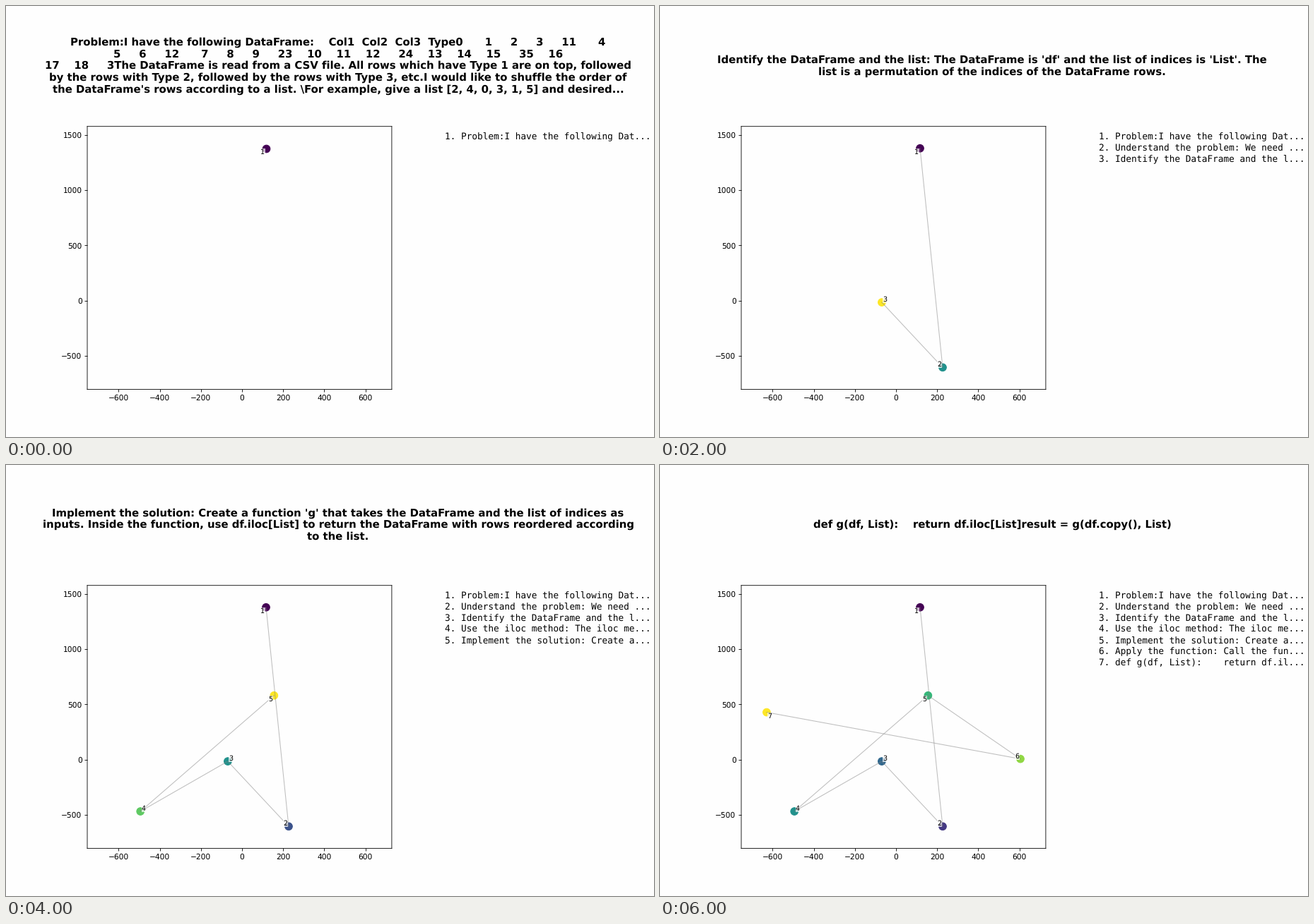
Recreate the animation shown at these times as a matplotlib script. Size 917 by 611 pixels, loop 7 s.

```python
import matplotlib.pyplot as plt
from matplotlib.animation import FuncAnimation

W, H, DPI = 917, 611, 76.4
PAPER = "#fefefe"

plt.rcParams["text.hinting"] = "none"

# Title lines of every step
STEPS = [
    ["Problem:I have the following DataFrame:    Col1  Col2  Col3  Type0"
     "      1     2     3     11      4",
     "5     6     12      7     8     9     23    10    11    12     24"
     "    13    14    15     35    16",
     "17    18     3The DataFrame is read from a CSV file. "
     "All rows which have Type 1 are on top, followed",
     "by the rows with Type 2, followed by the rows with Type 3, etc."
     "I would like to shuffle the order of",
     "the DataFrame's rows according to a list. \\For example, "
     "give a list [2, 4, 0, 3, 1, 5] and desired..."],
    ["Understand the problem: We need to shuffle the rows of the DataFrame "
     "according to a given list of",
     "indices. The list specifies the new order of the rows."],
    ["Identify the DataFrame and the list: The DataFrame is 'df' and the list "
     "of indices is 'List'. The",
     "list is a permutation of the indices of the DataFrame rows."],
    ["Use the iloc method: The iloc method in pandas is used for "
     "integer-location based indexing. We can",
     "pass the list of indices to iloc to reorder the rows of the DataFrame "
     "according to the list."],
    ["Implement the solution: Create a function 'g' that takes the DataFrame "
     "and the list of indices as",
     "inputs. Inside the function, use df.iloc[List] to return the DataFrame "
     "with rows reordered according",
     "to the list."],
    ["Apply the function: Call the function 'g' with a copy of the original "
     "DataFrame and the list of",
     "indices to avoid modifying the original DataFrame. Assign the result "
     "to the variable 'result'."],
    ["def g(df, List):    return df.iloc[List]result = g(df.copy(), List)"],
]

# x, y, then the side of the point its number sits on
POINTS = [
    (117, 1378, "right", "top"),
    (227, -605, "right", "bottom"),
    (-69, -16, "left", "bottom"),
    (-494, -469, "left", "bottom"),
    (156, 580, "right", "top"),
    (605, 6, "right", "bottom"),
    (-629, 428, "left", "top"),
]
XS = [p[0] for p in POINTS]
YS = [p[1] for p in POINTS]

# Stage pixels, counted from the top left
LEFT, TOP, RIGHT, BOTTOM = 115, 170.7, 545.9, 543.4
TITLE_X, TITLE_Y = 470, 85
TITLE_STEP, TITLE_RISE, TITLE_DROP = 16.81, 11.46, 3.06
LIST_X, LIST_Y, LIST_STEP = 620.7, 189.3, 15.89


def padded(values):
    pad = 0.1 * (max(values) - min(values))
    return min(values) - pad, max(values) + pad


def stage_text(x, y, text, **style):
    """Text with its baseline at stage pixels."""
    return fig.text(x / W, 1 - y / H, text, va="baseline", **style)


# The tiny surplus guards against the pixel size being truncated
fig = plt.figure(figsize=((W + 1e-6) / DPI, (H + 1e-6) / DPI), dpi=DPI,
                 facecolor=PAPER)
ax = fig.add_axes([LEFT / W, 1 - BOTTOM / H,
                   (RIGHT - LEFT) / W, (BOTTOM - TOP) / H], facecolor=PAPER)
ax.set_xlim(padded(XS))
ax.set_ylim(padded(YS))
for spine in ax.spines.values():
    spine.set_snap(False)

dots = ax.scatter([], [], s=100, c=[], cmap="viridis")
path, = ax.plot([], [], color="gray", alpha=0.5, lw=1)

tags = []
for i, (x, y, ha, va) in enumerate(POINTS):
    dx = 1.7 if ha == "left" else -1.7
    tags.append(ax.annotate(
        str(i + 1), (x, y), xytext=(dx, -0.8), textcoords="offset pixels",
        ha=ha, va=va, fontsize=9,
        bbox=dict(facecolor="white", edgecolor="none", alpha=0.7, pad=0.3)))

titles = [stage_text(TITLE_X, 0, "", ha="center", fontsize=14, weight="bold")
          for _ in range(max(map(len, STEPS)))]

entries = [stage_text(LIST_X, LIST_Y + i * LIST_STEP,
                      f"{i + 1}. {' '.join(lines)[:32]}...",
                      fontsize=12, family="DejaVu Sans Mono")
           for i, lines in enumerate(STEPS)]


def show_title(lines):
    height = (len(lines) - 1) * TITLE_STEP + TITLE_RISE + TITLE_DROP
    first = TITLE_Y - height / 2 + TITLE_RISE
    for i, title in enumerate(titles):
        title.set_text(lines[i] if i < len(lines) else "")
        title.set_y(1 - (first + i * TITLE_STEP) / H)


def update(step):
    n = step + 1
    show_title(STEPS[step])
    dots.set_offsets(list(zip(XS[:n], YS[:n])))
    dots.set_array(list(range(n)))
    dots.set_clim(0, max(step, 1))
    path.set_data(XS[:n], YS[:n])
    for i, (tag, entry) in enumerate(zip(tags, entries)):
        tag.set_visible(i < n)
        entry.set_visible(i < n)
    return [dots, path, *tags, *titles, *entries]


anim = FuncAnimation(fig, update, frames=len(STEPS), interval=1000,
                     repeat=True, repeat_delay=0)
plt.show()
```
